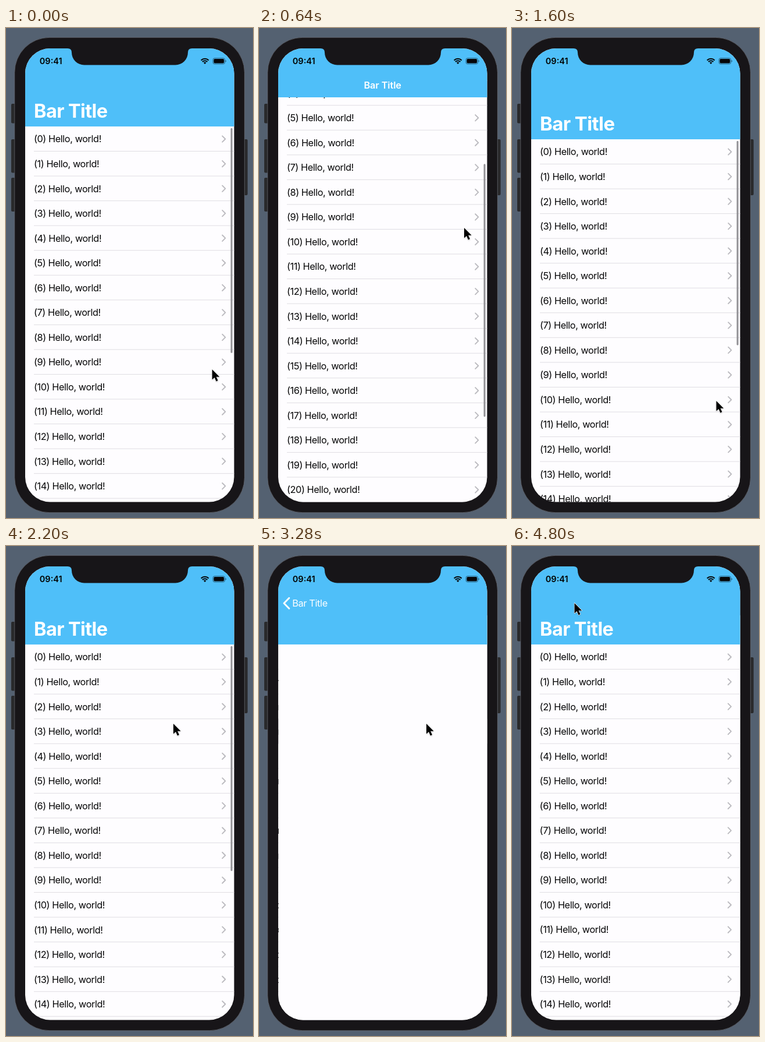
Write an HTML page that moves like this. It is 425 px wide and 841 px high and loops after 4840 ms.

```html
<!DOCTYPE html>
<html lang="en">
<head>
<meta charset="utf-8">
<title>Scrolling list</title>
<style>
  html, body { margin: 0; width: 100%; height: 100%; overflow: hidden; background: #546171; }
  svg { display: block; width: 100%; height: 100%; }
  text { font-family: Inter, Roboto, sans-serif; font-size: 16.27px; white-space: pre; }
  .row text { letter-spacing: -.41px; fill: #060607; }
  .row path { fill: none; stroke: #bbbabf; stroke-width: 1.9; stroke-linecap: round; stroke-linejoin: round; }
  .row line { stroke: #dfdde2; stroke-width: 1; }
  .nav { fill: #fff; }
  #large { font-size: 32.5px; font-weight: 700; letter-spacing: -.6px; }
  #inline { font-weight: 600; letter-spacing: -.1px; text-anchor: middle; }
  #label { letter-spacing: -.36px; }
  #clock { font-size: 14.5px; font-weight: 600; }
</style>
</head>
<body>
<svg viewBox="0 0 425 841" preserveAspectRatio="none">
  <defs>
    <clipPath id="screen"><rect x="33" y="35" width="359.5" height="778.5" rx="43"/></clipPath>
    <clipPath id="titleArea"><rect id="titleClip" x="33" y="119" width="360" height="200"/></clipPath>
    <filter id="soft" x="-50%" y="-50%" width="200%" height="200%"><feGaussianBlur stdDeviation="1.3"/></filter>
  </defs>

  <rect width="425" height="841" fill="#546171"/>
  <g fill="#29292b">
    <rect x="9" y="130" width="9" height="33.5" rx="2"/>
    <rect x="9" y="191" width="9" height="57.5" rx="2"/>
    <rect x="9" y="257" width="9" height="58" rx="2"/>
    <rect x="407" y="191" width="8.7" height="96" rx="2"/>
  </g>
  <rect x="14.8" y="16.3" width="395.6" height="815.4" rx="60" fill="#171518" stroke="#6a6d74" stroke-width=".7"/>

  <g clip-path="url(#screen)">
    <rect x="33" y="35" width="360" height="779" fill="#fefdff"/>
    <g id="list">
      <rect id="pressed" x="33" y="296.7" width="470" height="42.5" fill="#d5d4d8"/>
      <g id="rows"></g>
    </g>
    <rect id="bar" x="386.6" width="3" rx="1.5" fill="#929195"/>
    <rect id="dim" x="33" y="119" width="360" height="695"/>
    <rect id="sheet" x="33" y="119" width="361" height="695" fill="#fefdff"/>
    <rect id="header" x="33" y="35" width="360" fill="#4fbff9"/>
    <g class="nav">
      <g clip-path="url(#titleArea)"><text id="large">Bar Title</text></g>
      <text id="inline" x="212.7" y="104">Bar Title</text>
      <g id="back">
        <path d="M51.8 89.2 43 98.2 51.8 107.2" fill="none" stroke="#fff" stroke-width="2.9" stroke-linecap="round" stroke-linejoin="round"/>
        <text id="label">Bar Title</text>
      </g>
    </g>
    <path d="M106 34V35q7 0 7 7a21.5 21.5 0 0 0 21.5 21.5H291.500a21.500 21.500 0 0 0 21.500-21.500q0-7 7-7V34z" fill="#171518"/>
    <text id="clock" x="57.8" y="62.2">09:41</text>
    <g fill="none" stroke="#050608" stroke-width="2.1">
      <path d="M335.700 55.500a9.200 9.200 0 0 1 13 0M338 58a6 6 0 0 1 8.400 0"/>
      <path d="M342.200 61.900l-2.300-2.400a3.300 3.300 0 0 1 4.600 0z" fill="#050608" stroke="none"/>
    </g>
    <rect x="356" y="51.700" width="20.600" height="10.200" rx="3" fill="none" stroke="#245a78" stroke-width=".9"/>
    <rect x="357.400" y="53.100" width="17.800" height="7.400" rx="1.800" fill="#050608"/>
    <path d="M377.700 55.200q1.300 .3 1.300 1.600t-1.300 1.600z" fill="#245a78"/>
  </g>

  <g id="cursor">
    <path d="M0 1V18.500l4.200-3.800 3 6.700 3-1.300-3-6.600h5.600z" opacity=".38" filter="url(#soft)"/>
    <path d="M0 0V17.600l4.100-3.700 2.900 6.500 3-1.300-2.900-6.400h5.600z" stroke="#fff" stroke-width="1.300" stroke-linejoin="round" paint-order="stroke"/>
  </g>
</svg>
<script>
  const LOOP = 4840, STEP = 40, PITCH = 42.55, COLLAPSE = 50;
  const PUSH = 2810, POP = 4365;
  const el = id => document.getElementById(id);
  const set = (id, attrs) => {
    for (const key in attrs) el(id).setAttribute(key, attrs[key]);
  };
  const ramp = (t, from, to) => Math.min(1, Math.max(0, (t - from) / (to - from)));
  const smooth = u => u * u * (3 - 2 * u);
  const mix = (a, b, u) => a + (b - a) * u;

  // Critically damped spring from 0 to 1
  const spring = (t, start, rate) => {
    const u = Math.max(0, t - start) * rate;
    return 1 - (1 + u) * Math.exp(-u);
  };

  el('rows').innerHTML = Array.from({ length: 25 }, (_, i) => {
    const y = 190.5 + i * PITCH;
    return `<g class="row"><text x="48" y="${y + 5.9}">(${i}) Hello, world!</text>
      <path d="M372.2 ${y - 5.2}l5.2 5.2-5.2 5.2"/>
      <line x1="48" x2="393" y1="${y + 21}" y2="${y + 21}"/></g>`;
  }).join('');

  function scrollAt(t) {
    const coast = time => 290 - 153 * Math.exp(-(time - 320) / 243);
    if (t < 320) return 137 * ramp(t, 20, 320) ** 1.4;
    if (t < 1120) return coast(t);
    if (t < 1600) return mix(coast(1120), -22, smooth(ramp(t, 1120, 1600)));
    return -22 * (1 - spring(t, 1610, .013));
  }

  // start, end, then the tip position reached
  const moves = [
    [0, 320, 353, 343],
    [1100, 1600, 351.5, 640],
    [1690, 2200, 288, 305],
    [3330, 4020, 107.5, 98]
  ];

  function cursorAt(t) {
    return moves.reduce(([x, y], [from, to, toX, toY]) => {
      const u = smooth(ramp(t, from, to));
      return [mix(x, toX, u), mix(y, toY, u)];
    }, [354.7, 586]);
  }

  function draw(t) {
    const scroll = scrollAt(t);
    const edge = Math.max(119, 169 - scroll);
    const popped = spring(t, POP, .018);
    const push = spring(t, PUSH, .018) * (1 - popped);
    const over = Math.max(0, -scroll);

    set('list', { transform: `translate(${-108 * push} ${-scroll})` });
    set('pressed', { opacity: t < 2720 ? 0 : 1 - popped });
    set('bar', {
      y: edge + 2.7 + .56 * Math.max(0, scroll - COLLAPSE),
      height: 434 - .96 * (Math.min(edge, 169) - 119) - 1.6 * over,
      opacity: 1 - ramp(t, 2280, 2560)
    });
    set('dim', { opacity: .08 * push });
    set('sheet', { x: 33 + 360 * (1 - push), opacity: push > 0 ? 1 : 0 });
    set('header', { height: edge - 35 });

    const x = mix(48, 57.3, push), y = mix(154.2 - scroll, 104, push);
    const scale = mix(1 + over * .0007, .5, push);
    set('titleClip', { y: push > 0 ? 35 : 119 });
    set('large', { transform: `translate(${x} ${y}) scale(${scale})`, opacity: 1 - ramp(push, 0, .8) });
    set('label', { transform: `translate(${x} ${y}) scale(${2 * mix(1, .5, push)})` });
    set('back', { opacity: ramp(push, .2, 1) * (t >= 4240 ? .4 : 1) });
    set('inline', { opacity: ramp(t, 180, 360) * (1 - ramp(t, 1400, 1520)) });
    set('cursor', { transform: `translate(${cursorAt(t).join(' ')})` });
  }

  const start = performance.now();
  function tick() {
    const t = (performance.now() - start) % LOOP;
    draw(Math.floor(t / STEP) * STEP);
    requestAnimationFrame(tick);
  }
  tick();
</script>
</body>
</html>
```
